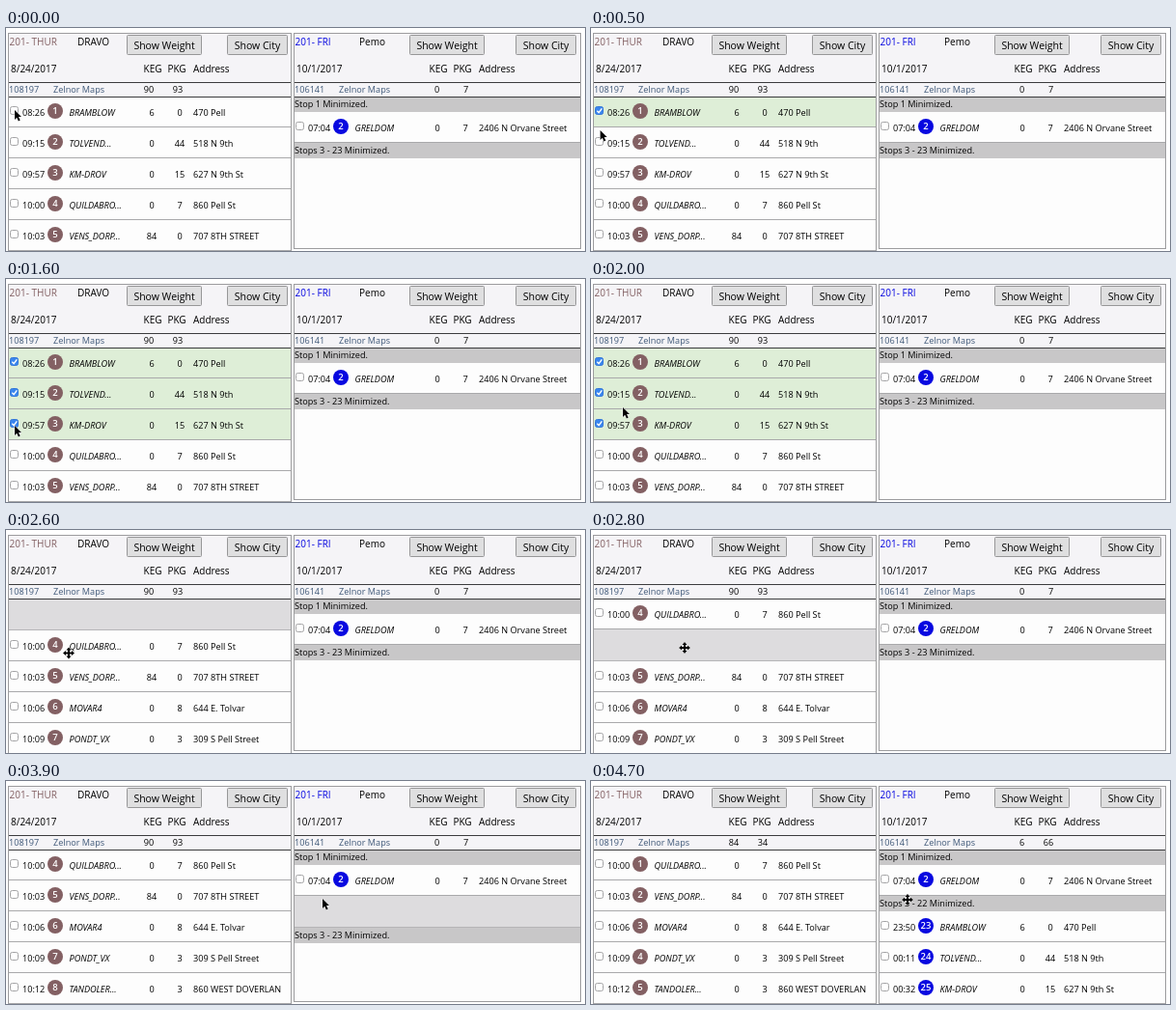
Recreate the animation shown at these times as an HTML page. Size 600 px wide and 231 px high, loop 4.8 s.

```html
<!DOCTYPE html>
<html lang="en">
<head>
<meta charset="utf-8">
<title>Route stops drag and drop</title>
<style>
  html, body { margin: 0; width: 100%; height: 100%; overflow: hidden; background: #fff; }
  svg { display: block; }
  text { font-family: "Open Sans", "Noto Sans", sans-serif; font-size: 9.15px; white-space: pre; }
  .head { font-size: 10px; }
  .button { font-size: 10.5px; }
  .mid { text-anchor: middle; }
  .end { text-anchor: end; }
  .name { font-style: italic; }
  .badge { font-size: 9.5px; font-weight: 600; text-anchor: middle; }
</style>
</head>
<body>
<svg id="stage" width="600" height="231" viewBox="0 0 600 231"></svg>
<script>
const LOOP = 4800, STEP = 100;
const DRAG = 25, DROP = 41;
const BROWN = '#836063', BLUE = '#0808e0', LINK = '#3f5878';
const ROW = 32, BAR = 16, GAP = 33, TOP = 71;

// time, number, name, kegs, packages, address
const stops = [
  ['08:26', 1, 'BRAMBLOW', 6, 0, '470 Pell'],
  ['09:15', 2, 'TOLVEND...', 0, 44, '518 N 9th'],
  ['09:57', 3, 'KM-DROV', 0, 15, '627 N 9th St'],
  ['10:00', 4, 'QUILDABRO...', 0, 7, '860 Pell St'],
  ['10:03', 5, 'VENS_DORP...', 84, 0, '707 8TH STREET'],
  ['10:06', 6, 'MOVAR4', 0, 8, '644 E. Tolvar'],
  ['10:09', 7, 'PONDT_VX', 0, 3, '309 S Pell Street'],
  ['10:12', 8, 'TANDOLER...', 0, 3, '860 WEST DOVERLAN']
];
const fixedStop = ['07:04', 2, 'GRELDOM', 0, 7, '2406 N Orvane Street'];
const newTimes = ['23:50', '00:11', '00:32'];
const checkedAt = [3, 9, 16];

// step, x, y of the pointer
const path = [
  [0, 9, 85], [2, 9, 85], [7, 10, 120], [11, 10, 120], [14, 9, 152], [16, 9, 152],
  [19, 33, 133], [24, 33, 133], [28, 97, 122], [30, 110, 122], [34, 322, 127],
  [37, 328, 122], [39, 328, 122], [41, 328, 123], [48, 328, 123]
];

const rect = (x, y, w, h, fill, more = '') =>
  `<rect x="${x}" y="${y}" width="${w}" height="${h}" fill="${fill}" ${more}/>`;
const text = (x, y, s, cls = '', fill = '#000') =>
  `<text x="${x}" y="${y}" class="${cls}" fill="${fill}">${s}</text>`;
const line = (x, y, w, color = '#a9a9ab') => rect(x, y, w, 1, color);

function button(x, w, label) {
  return rect(x + .5, 7.5, w, 20, '#dfdfe0', 'rx="1" stroke="#979798"') +
    text(x + w / 2 + .5, 21.5, label, 'button mid');
}

function checkbox(x, y, on) {
  return rect(x + 4.5, y + 10.5, 8, 8, on ? '#3a86ee' : '#fff',
    `rx="2" stroke="${on ? '#3477d8' : '#a4a4a6'}"`) +
    (on ? `<path d="M${x + 6.3} ${y + 14.7}l1.8 2l3.2-4.4" fill="none" stroke="#fff" stroke-width="1.4"/>` : '');
}

function row(x, y, w, [time, num, name, keg, pkg, address], color, on) {
  const base = y + 19.8;
  return rect(x, y, w, ROW, on ? '#deeed7' : '#fdfdfd') +
    line(x, y + ROW - 1, w) + checkbox(x, y, on) +
    text(x + 17, base, time) +
    `<circle cx="${x + 51}" cy="${y + 15}" r="8" fill="${color}"/>` +
    text(x + 51, y + 18.4, num, 'badge', '#fff') +
    text(x + 65.5, base, name, 'name') +
    text(x + 151, base, keg, 'mid') + text(x + 180, base, pkg, 'mid') +
    text(x + 194, base, address);
}

function bar(x, y, w, label) {
  return rect(x, y, w, BAR, '#c8c7c8') + text(x, y + 11.2, label);
}

function panel(x, w, bottom, { route, driver, driverX, date, id, totals, color, cityX, weightX }) {
  return rect(x + 2.5, 5.5, w, bottom - 5.5, '#fdfdfd', 'stroke="#9c9c9e"') +
    rect(x + 3, 6, w - 1, 65, '#f5f4f7') +
    text(x + 3.5, 18, route, 'head', color) + text(driverX, 18, driver, 'head') +
    button(weightX, 77, 'Show Weight') + button(cityX, 62, 'Show City') +
    text(x + 5, 46, date, 'head') +
    text(x + 152, 46, 'KEG', 'head mid') + text(x + 177, 46, 'PKG', 'head mid') +
    text(x + 194, 46, 'Address', 'head') +
    text(x + 3, 66.7, id, '', LINK) + text(x + 49, 66.7, 'Zelnor Maps', '', LINK) +
    text(x + 153.2, 66.7, totals[0], 'end') + text(x + 183.2, 66.7, totals[1], 'end');
}

const rules = (x, w) => line(x, 56, w, '#3c3c3e') + line(x, 71, w, '#3c3c3e');

// Stacks items downwards; each is [height, draw(y)]
function stack(items) {
  let y = TOP;
  return items.map(([h, draw]) => {
    const out = draw(y);
    y += h;
    return out;
  }).join('');
}

const gap = (x, w) => [GAP, y => rect(x, y, w, GAP, '#dddcde') + line(x, y + GAP - 1, w, '#b5b5b7')];

function leftList(n) {
  const rest = n < DRAG ? stops : stops.slice(3);
  const items = rest.map(([time, num, ...info], i) => [ROW, y =>
    row(0, y, 295, [time, n < DROP ? num : num - 3, ...info], BROWN, n < DRAG && n >= checkedAt[i])]);
  if (n >= DRAG && n < 33) items.splice(n < 27 ? 0 : 1, 0, gap(3, 292));
  return stack(items);
}

function rightList(n) {
  const x = 296, dropped = n >= DROP;
  const items = [
    [BAR, y => bar(299, y, 296, 'Stop 1 Minimized.')],
    [ROW, y => row(x, y, 299, fixedStop, BLUE)],
    [BAR, y => bar(299, y, 296, `Stops 3 - ${dropped ? 22 : 23} Minimized.`)]
  ];
  if (dropped) {
    stops.slice(0, 3).forEach(([, num, ...info], i) =>
      items.push([ROW, y => row(x, y, 299, [newTimes[i], num + 22, ...info], BLUE)]));
  } else if (n >= 33) {
    items.splice(n < 37 ? 3 : 2, 0, gap(299, 296));
  }
  return stack(items);
}

function pointer(n) {
  const i = path.findIndex(p => p[0] > n), [a, ax, ay] = path[i - 1], [b, bx, by] = path[i];
  const k = (n - a) / (b - a), x = ax + (bx - ax) * k, y = ay + (by - ay) * k;
  const move = n >= DRAG && n < 37 || n >= DROP;
  const shape = move
    ? 'M0-6l2.6 3H1v2h2v-1.6L6 0 3 2.6V1H1v2h1.6L0 6l-2.6-3H-1V1h-2v1.6L-6 0l3-2.6V-1h2v-2h-1.6z'
    : 'M0 0v10l2.2-2.2 1.7 3.6 1.8-.8-1.7-3.5H7z';
  return `<path transform="translate(${x} ${y})" d="${shape}" fill="#000" stroke="#fff" paint-order="stroke"/>`;
}

function scene(n) {
  const dropped = n >= DROP;
  return `<clipPath id="left"><rect x="3" y="${TOP}" width="292" height="160"/></clipPath>
    <clipPath id="right"><rect x="299" y="${TOP}" width="296" height="160"/></clipPath>` +
    panel(0, 293, 240, {
      route: '201- THUR', driver: 'DRAVO', driverX: 74, date: '8/24/2017', id: '108197',
      totals: dropped ? [84, 34] : [90, 93], color: BROWN, weightX: 125, cityX: 229
    }) +
    panel(296, 297, dropped ? 240 : 228.5, {
      route: '201- FRI', driver: 'Pemo', driverX: 366, date: '10/1/2017', id: '106141',
      totals: dropped ? [6, 66] : [0, 7], color: BLUE, weightX: 418, cityX: 528
    }) +
    `<g clip-path="url(#left)">${leftList(n)}</g><g clip-path="url(#right)">${rightList(n)}</g>` +
    rules(3, 292) + rules(299, 296) + pointer(n);
}

const stage = document.getElementById('stage');
let shown = -1;
function tick() {
  const n = Math.floor(performance.now() % LOOP / STEP);
  if (n !== shown) stage.innerHTML = scene(shown = n);
  requestAnimationFrame(tick);
}
tick();
</script>
</body>
</html>
```
